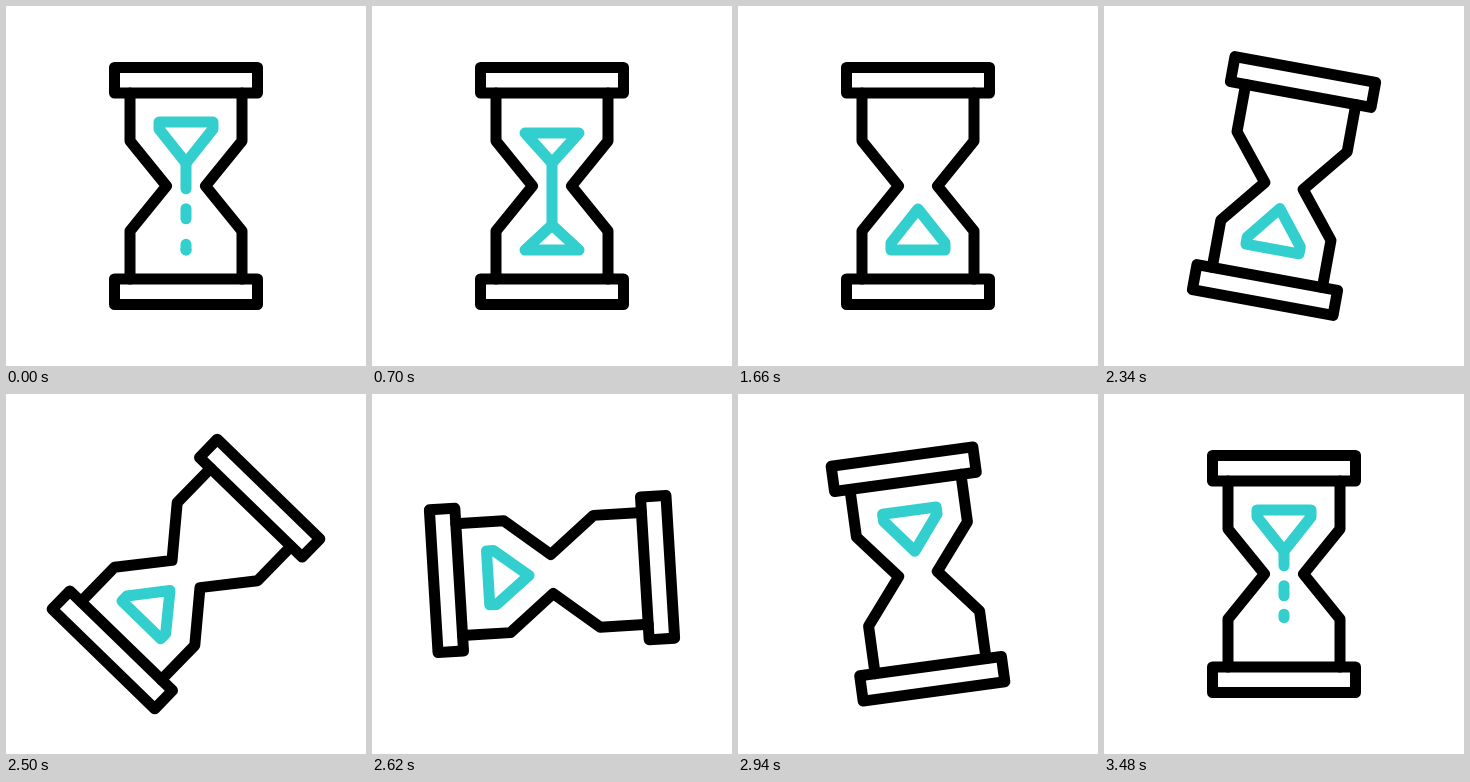
These frames come from a looping animation (360 px wide and 360 px high, 3500 ms). An HTML page with a canvas:

```html
<!DOCTYPE html>
<html lang="en">
<head>
<meta charset="utf-8">
<title>Hourglass</title>
<style>
  html, body { margin: 0; width: 100%; height: 100%; overflow: hidden; background: #fff; }
  canvas { display: block; }
</style>
</head>
<body>
<canvas width="360" height="360"></canvas>
<script>
const ctx = document.querySelector('canvas').getContext('2d');
const LOOP = 3500, FLOOR = 244, NECK = 157, SPEED = 0.55;
const INK = '#000', SAND = '#33cfcf';
const TURN_START = 2164, TURN_END = 3096;
const FIRST_HALF = 700, EMPTY = 1550, SETTLED = 1650;

const clamp = (v, lo = 0, hi = 1) => Math.min(hi, Math.max(lo, v));
const progress = (t, from, to) => clamp((t - from) / (to - from));

// cubic-bezier(.5, 0, .5, 1)
function ease(x) {
  let lo = 0, hi = 1;
  for (let i = 0; i < 24; i++) {
    const u = (lo + hi) / 2;
    if (1.5 * u * (1 - u) + u ** 3 < x) lo = u; else hi = u;
  }
  return lo * lo * (3 - 2 * lo);
}

function stroke(points, color, closed) {
  ctx.strokeStyle = color;
  ctx.beginPath();
  points.forEach(([x, y]) => ctx.lineTo(x, y));
  if (closed) ctx.closePath();
  ctx.stroke();
}

function glass() {
  for (const y of [61.5, 273]) {
    stroke([[108.5, y], [251.5, y], [251.5, y + 25.5], [108.5, y + 25.5]], INK, true);
  }
  for (const side of [-1, 1]) {
    const x = 180 + side * 56, neck = 180 + side * 19.5;
    stroke([[x, 87], [x, 135], [neck, 180], [x, 225], [x, 273]], INK);
  }
}

function pile(half, base, shoulder, tip) {
  const l = 180 - half, r = 180 + half;
  stroke([[l, base], [r, base], [r, shoulder], [180, tip], [l, shoulder]], SAND, true);
}

function fall(from, to) {
  stroke([[180, from], [180, to + 0.01]], SAND);
}

function stream(f, tip) {
  const head = NECK + 1 + SPEED * (f + 44);
  const tail = NECK + SPEED * Math.max(0, f - EMPTY);
  const end = Math.min(head, tip);
  if (end > tail) fall(tail, end);
  if (f > 130) return;

  const run = head - NECK - 1;
  const drops = [
    [head + 20, head + 30],
    [197.7 + 1.64 * run, 197.7 + 1.64 * run + Math.max(0, run / 4)]
  ];
  for (const [a, b] of drops) {
    if (b > NECK && a < tip) fall(Math.max(a, NECK), Math.min(b, tip));
  }
}

function draw(t) {
  ctx.fillStyle = '#fff';
  ctx.fillRect(0, 0, 360, 360);
  ctx.lineWidth = 11;
  ctx.lineCap = ctx.lineJoin = 'round';

  const turning = t >= TURN_START;
  const f = turning ? t - LOOP : t;
  const a = progress(f, 0, FIRST_HALF);
  const drain = progress(f, FIRST_HALF, EMPTY);
  const fill = progress(f, FIRST_HALF, SETTLED);
  const tip = FLOOR - 25 * a - 16 * fill;

  ctx.save();
  ctx.translate(180, 180);
  ctx.rotate(Math.PI * ease(progress(t, TURN_START, TURN_END)));
  ctx.translate(-180, -180);
  glass();
  if (turning) pile(27, FLOOR, 237, 203);
  ctx.restore();

  if (!turning) {
    if (drain < 1) {
      pile(27 * (1 - drain), 116 + 11 * a + 30 * drain, 123 + 4 * a + 30 * drain, NECK);
    }
    if (f > 0) pile(27 * a, FLOOR, FLOOR - 7 * fill, tip);
  }
  if (!turning || t > TURN_END) stream(f, tip);
}

const start = performance.now();
function tick() {
  draw((performance.now() - start) % LOOP);
  requestAnimationFrame(tick);
}
tick();
</script>
</body>
</html>
```
